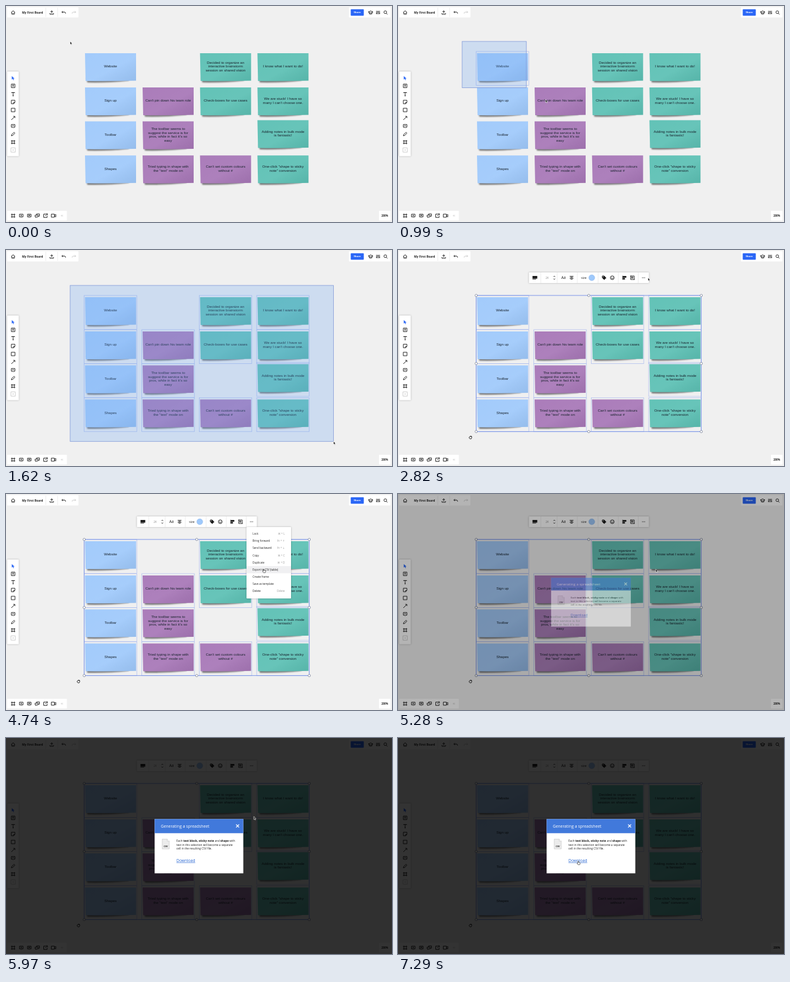
An HTML page that plays this animation: 650 by 366 pixels, repeating every 7.44 s.

```html
<!DOCTYPE html>
<html lang="en">
<head>
<meta charset="utf-8">
<title>Board export</title>
<style>
  html, body { margin: 0; width: 100%; height: 100%; overflow: hidden; background: #f0f0f0; }
  svg { display: block; width: 100vw; height: 100vh; font: 4.5px "Open Sans", "DejaVu Sans", sans-serif; fill: #222; }
  .panel { fill: #fff; }
  .raised { filter: drop-shadow(0 .7px 1.6px #0004); }
  .icon { fill: none; stroke: #1c1c1c; stroke-width: .95; stroke-linejoin: round; }
  .faint { stroke: #ccc; }
  .solid { fill: #1c1c1c; }
  .rule { stroke: #e4e4e4; stroke-width: .7; }
  .note { font: 6.1px "Liberation Sans", Arial, sans-serif; fill: #18222c; }
  .outline { fill: none; stroke: #a9b9ee; stroke-width: .7; }
  .bold { font-weight: 700; }
  .mid { text-anchor: middle; }
  .end { text-anchor: end; }
  .cursor { fill: #111; stroke: #fff; stroke-width: .6; }
</style>
</head>
<body>
<svg id="stage" viewBox="0 0 650 366"></svg>
<script>
const LOOP = 7440, RELEASE = 1740, MENU_OPEN = 3780, EXPORT = 5220, LINK_HOVER = 6810;
const COLUMNS = [133, 230, 326.7, 423.4], ROWS = [80, 138, 195.5, 253.3];
const BLUE = '#9fc9fb', PURPLE = '#a777b7', TEAL = '#5cc0b4';

// column, row, colour, lines, vertical offset
const notes = [
  [0, 0, BLUE, 'Website'], [0, 1, BLUE, 'Sign up'], [0, 2, BLUE, 'Toolbar'], [0, 3, BLUE, 'Shapes'],
  [1, 1, PURPLE, "Can't pin down his team role"],
  [1, 2, PURPLE, "The toolbar seems to|suggest the service is for|pros, while in fact it's so|easy"],
  [1, 3, PURPLE, 'Tried typing in shape with|the "text" mode on'],
  [2, 0, TEAL, 'Decided to organize an|interactive brainstorm|session on shared vision'],
  [2, 1, TEAL, 'Check-boxes for use cases'],
  [2, 3, PURPLE, "Can't set custom colours|without #"],
  [3, 0, TEAL, 'I know what I want to do!'],
  [3, 1, TEAL, "We are stuck! I have so|many I can't choose one."],
  [3, 2, TEAL, 'Adding notes in bulk mode|is fantastic!', -2],
  [3, 3, TEAL, 'One-click "shape to sticky|note" conversion'],
].map(([col, row, color, text, dy = 0]) => ({ x: COLUMNS[col], y: ROWS[row] + dy, color, lines: text.split('|') }));

const menuItems = [
  ['Lock', '⌘ + L'], ['Bring forward', 'fn + ↑'], ['Send backward', 'fn + ↓'], ['Copy', '⌘ + C'],
  ['Duplicate', '⌘ + D'], ['Export to CSV (table)', ''], ['Create frame', ''],
  ['Save as template', ''], ['Delete', 'Delete'],
];
const MENU_TOP = 61.4, MENU_STEP = 12.15;

const rect = (x, y, w, h, attrs = '') => `<rect x="${x}" y="${y}" width="${w}" height="${h}" ${attrs}/>`;
const panel = (x, y, w, h, cls = '') => rect(x, y, w, h, `rx="1" class="panel ${cls}"`);
const text = (x, y, size, str, cls = '', attrs = '') =>
  `<text x="${x}" y="${y + size * .36}" style="font-size:${size}px" class="${cls}" ${attrs}>${str}</text>`;
const icon = (x, y, d, cls = '') => `<path transform="translate(${x} ${y})" class="icon ${cls}" d="${d}"/>`;
const rules = (xs, y, h) => `<path class="rule" d="${xs.map(x => `M${x} ${y}v${h}`).join('')}"/>`;

const FRAME = 'M-2-3.5V3.5M2-3.5V3.5M-3.5-2H3.5M-3.5 2H3.5';
const BUBBLE = 'M-3-2.5H3V2H1L0 3.2L-1 2H-3Z';

function drawNote({ x, y, color, lines }) {
  const first = 22.3 - (lines.length - 1) * 3.35;
  return `<g transform="translate(${x} ${y})">
    <path d="M2 42L4 49.6Q40 50.4 74 46.5V42Z" fill="#000" opacity=".5" filter="url(#soft)"/>
    <path d="M0 0H86V46.5Q45 47.6 1 47Z" fill="${color}"/>
    <path d="M0 0H86V46.5Q45 47.6 1 47Z" fill="url(#sheen)"/>
    ${lines.map((line, i) => text(43, first + i * 6.7, 6.1, line, 'note mid')).join('')}</g>`;
}

const chrome = () => panel(2, 2, 120, 17.5) + rules([67, 87], 3, 15.5) +
  icon(12, 11, 'M-3.2 0L0-3L3.2 0M-2.3-.8V2.8H2.3V-.8M0 2.8V1') +
  text(27, 10.8, 4.9, 'My First Board', 'bold') +
  icon(77, 11, 'M0 1.5V-3M-2-1L0-3L2-1M-3 1V3H3V1') +
  icon(97.3, 11, 'M-1.5-2.5L-3.2-.7L-1.5 1.1M-3-.7H1.5Q3-.5 3 1.8') +
  icon(114.3, 11, 'M1.5-2.5L3.2-.7L1.5 1.1M3-.7H-1.5Q-3-.5-3 1.8', 'faint') +
  panel(577.5, 2, 70, 17.5) + rect(580.5, 5.5, 22, 11, 'rx="1" fill="#2a66f6"') +
  text(591.5, 10.9, 4.2, 'Share', 'bold mid', 'fill="#fff"') +
  icon(614, 11, 'M-4-.8L0-2.6L4-.8L0 1ZM-2.3.2V2.2Q0 3.4 2.3 2.2V.2') +
  icon(626.5, 11, 'M-2.4-3V3M0-3V3M2.4-3V3M-3.3 1.2H-1.5M-.9-1H.9M1.5 1.2H3.3') +
  icon(639, 11, 'M1.4 1.4L3.3 3.3M2-.5A2.3 2.3 0 1 1-2.6-.5A2.3 2.3 0 1 1 2-.5') +
  panel(2, 111, 19.5, 143.5, 'raised') +
  `<path d="M10-0V6L11.6 4.6L12.8 7L13.8 6.4L12.7 4.2H14.6Z" transform="translate(-.3 118.7)" fill="#2a66f6"/>` +
  icon(12, 135.3, 'M-3-3H3V3H-3ZM0 1.7V-1.5M-1.4-.3L0-1.6L1.4-.3') +
  icon(12, 149.2, 'M-2.6-1.8V-2.7H2.6V-1.8M0-2.7V3M-1 3H1') +
  icon(12, 162.7, 'M-3-3H3V.8L.8 3H-3ZM3 .8H.8V3') +
  icon(12, 176.2, 'M-3.1-3H3.1V3H-3.1Z') +
  icon(12, 190, 'M-3 3L3-3M.2-3H3V-.2') +
  icon(12, 203.3, BUBBLE + 'M-1.4-.3H1.4') +
  icon(12, 217, 'M-3 3L-2.3.6L1.6-3L3-1.6L-.6 2.3Z') +
  icon(12, 230.7, FRAME) +
  icon(12, 244, 'M-3.7-3.7H3.7V3.7H-3.7ZM-1 0H1M0-1V1', 'faint') +
  panel(2, 347, 100.5, 16.5) +
  icon(12, 355.3, FRAME) +
  icon(25.7, 355.3, BUBBLE + 'M0-1.7V1M-1 0L0 1L1 0') +
  icon(39.2, 355.3, BUBBLE + 'M-1.5-1H1.5M-1.5.5H1.5') +
  icon(52.7, 355.3, 'M-1.2-1V-3H3.7V.8H1.5M-3.7-1H1.4V2H-1L-2.2 3.2V2H-3.7Z') +
  icon(66.5, 355.3, 'M.5-2.7H-3V3H2.7V.3M-.5.3L3.3-3.2M.8-3.2H3.3V-.8') +
  icon(80, 355.3, 'M-3.7-2.6H1.5V2.6H-3.7ZM1.5-.6L3.9-2.2V2.2L1.5.6') +
  icon(94, 355.3, 'M0-1.2L-1.3 0L0 1.2M1.8-1.2L.5 0L1.8 1.2', 'faint') +
  panel(628, 347, 19.5, 16.5) + text(637.8, 355.2, 4.3, '200%', 'bold mid');

const handle = (x, y) => `<circle cx="${x}" cy="${y}" r="2" fill="#fff" stroke="#777f96" stroke-width=".8"/>`;
const selection = () => rect(131.7, 77, 379, 230.7, 'fill="none" stroke="#6f8be6" stroke-width=".9"') +
  [131.7, 321.2, 510.7].map(x => [77, 192.3, 307.7].map(y => x === 321.2 && y === 192.3 ? '' : handle(x, y)).join('')).join('') +
  icon(122, 318, 'M1.5-1.8A2.2 2.2 0 1 0 2.2.4M-.6-2.3H2V.2') +
  panel(220.5, 38, 202, 18, 'raised') + rules([240.5, 268, 302, 337, 371, 404.5], 38, 18) +
  rect(226.5, 44, 8, 4.5, 'class="solid"') + icon(230.5, 49.3, 'M-4 0H2') +
  text(251, 47, 4.5, '24', 'mid', 'fill="#888"') +
  icon(263.3, 47, 'M-1.3-1.6L0-3L1.3-1.6M-1.3 1.6L0 3L1.3 1.6') +
  text(278.7, 47, 6.3, 'Aa', 'mid') +
  icon(292.3, 47, 'M-3.2-2.4H3.2M-1.8-.8H1.8M-3.2.8H3.2M-1.8 2.4H1.8') +
  text(312.8, 47, 5.2, 'size', 'mid') +
  `<circle cx="326.3" cy="47" r="5" fill="${BLUE}" stroke="#86b3ea" stroke-width=".5"/>` +
  icon(347, 47, 'M-3-3H.3L3.3.2L.3 3.2L-3 0Z', 'solid') + '<circle cx="345.4" cy="45.4" r=".7" fill="#fff"/>' +
  icon(360.8, 47, 'M3.2 0A3.2 3.2 0 1 1-3.2 0A3.2 3.2 0 1 1 3.2 0M-1.6.7Q0 2.5 1.6.7M-1.2-1.3V-.5M1.2-1.3V-.5') +
  icon(381.3, 47, 'M-3-3.3V3.3M-2.2-2.4H2.8V-.6H-2.2ZM-2.2.9H.6V2.6H-2.2Z', 'solid') +
  icon(394.8, 47, 'M-3-3H3V3H-3ZM-1.3-1.3H.8V.8H-1.3ZM-3.7-3H-2.3M2.3 3H3.7') +
  [-2, 0, 2].map(dx => `<circle cx="${413.5 + dx}" cy="47" r=".65" fill="#555"/>`).join('');

const menu = () => panel(405, 56, 75, 121, 'raised') + rect(405, 0, 75, MENU_STEP, 'id="hover" fill="#f0f0f2"') +
  menuItems.map(([label, keys], i) => {
    const y = MENU_TOP + MENU_STEP * (i + .5);
    return text(415.3, y, 4.5, label) + text(469.5, y, 4.4, keys, 'end', 'fill="#999"');
  }).join('');

const dialog = () => rect(250.3, 137.3, 149.3, 92, 'fill="#fff"') + rect(250.3, 137.3, 149.3, 24, 'fill="#4179db"') +
  text(260.7, 149.6, 6.8, 'Generating a spreadsheet', '', 'fill="#fff"') +
  '<path d="M387.5 146.5l5 5m0-5l-5 5" stroke="#fff" stroke-width="1.2"/>' +
  '<path d="M263 171.3h8.5l3.5 3.5v13.2h-12z" fill="#ececec" stroke="#b5b5b5" stroke-width=".5"/>' +
  '<path d="M271.5 171.3v3.5h3.5" fill="#fff" stroke="#b5b5b5" stroke-width=".5"/>' +
  text(269, 183.6, 3.8, 'CSV', 'bold mid') +
  text(287, 174.6, 4.7, 'Each <tspan class="bold">text block, sticky note</tspan> and <tspan class="bold">shape</tspan> with') +
  text(287, 181.1, 4.7, 'text in this selection will become a separate') +
  text(287, 187.6, 4.7, 'cell in the resulting CSV file.') +
  text(287, 207.4, 6.7, 'Download', '', 'fill="#2463d1" text-decoration="underline"');

document.getElementById('stage').innerHTML = `
  <defs>
    <filter id="soft" x="-10%" y="-60%" width="120%" height="220%"><feGaussianBlur stdDeviation=".8"/></filter>
    <linearGradient id="sheen" x2="1" y2="1">
      <stop stop-color="#fff" stop-opacity=".04"/><stop offset=".55" stop-color="#fff" stop-opacity=".07"/>
      <stop offset="1" stop-color="#000" stop-opacity=".06"/>
    </linearGradient>
  </defs>
  ${rect(0, 0, 650, 366, 'fill="#f0f0f0"')}
  ${notes.map(drawNote).join('')}
  ${notes.map(n => rect(n.x - 1.3, n.y - 3, 88.5, 57.5, 'class="outline"')).join('')}
  ${rect(108, 60, 0, 0, 'id="marquee" fill="#64a0f0" fill-opacity=".25" stroke="#7f98d8" stroke-width=".8"')}
  ${chrome()}
  <g id="selection">${selection()}</g>
  <g id="menu">${menu()}</g>
  ${rect(0, 0, 650, 366, 'id="dim" fill="#000"')}
  <g id="dialog">${dialog()}</g>
  <g id="cursor" class="cursor">
    <path id="arrow" d="M0 0V5.2L1.2 4.2L2.1 6L3 5.6L2.1 3.8H3.7Z"/>
    <path id="hand" fill="#fff" stroke="#111" d="M-.6 0Q0-.7.6 0V2L3 2.6Q3.5 2.9 3.3 4L2.7 6H-.6L-2.1 3.8Q-2-3-.6 3.6Z"/>
  </g>`;

const $ = id => document.getElementById(id);
$('hand').setAttribute('d', 'M-.6.2Q0-.6.6.2V2.1L2.9 2.6Q3.4 2.9 3.2 4L2.6 6H-.5L-2 3.9Q-1.8 2.8-.6 3.5Z');
const outlines = [...document.querySelectorAll('.outline')];
const show = (el, visible) => el.style.display = visible ? '' : 'none';
const set = (el, attrs) => Object.entries(attrs).forEach(([k, v]) => el.setAttribute(k, v));
const clamp = v => Math.min(1, Math.max(0, v));

// start, end, target x, target y, bend of the path
const moves = [
  [660, 1530, 551.5, 324.3, .86],
  [2080, 2800, 421, 47, 1],
  [3100, 3400, 415, 46, 1],
  [4020, 4600, 434, 127.3, 1],
  [5750, 6700, 303.5, 208.7, 1.3],
];
function pointer(t) {
  let x = 108, y = 60;
  for (const [start, end, tx, ty, bend] of moves) {
    const p = (1 - Math.cos(Math.PI * clamp((t - start) / (end - start)))) / 2;
    x += (tx - x) * p;
    y += (ty - y) * p ** bend;
  }
  return [x, y];
}

function render(t) {
  const [x, y] = pointer(t), [mx, my] = pointer(t - 45);
  const selected = t >= RELEASE, menuOpen = t >= MENU_OPEN && t < EXPORT;
  const row = Math.floor((y - MENU_TOP) / MENU_STEP), hovering = menuOpen && row >= 0;

  show($('marquee'), t > 700 && !selected);
  set($('marquee'), { width: Math.max(0, mx - 108), height: Math.max(0, my - 60) });
  notes.forEach((n, i) => show(outlines[i], selected || (mx > n.x + 43 && my > n.y + 23)));
  show($('selection'), selected);
  show($('menu'), menuOpen);
  show($('hover'), hovering);
  set($('hover'), { y: MENU_TOP + row * MENU_STEP });

  const left = 1 - clamp((t - EXPORT) / 300), open = 1 - left ** 3;
  set($('dim'), { opacity: .8 * (1 - left ** 2) });
  set($('dialog'), { opacity: open, transform: `translate(325 183) scale(${.8 + .2 * open}) translate(-325 -183)` });

  const pointing = hovering || t >= LINK_HOVER;
  show($('hand'), pointing);
  show($('arrow'), !pointing);
  set($('cursor'), { transform: `translate(${x} ${y})` });
}

const begin = performance.now();
function tick() {
  render((performance.now() - begin) % LOOP);
  requestAnimationFrame(tick);
}
tick();
</script>
</body>
</html>
```
